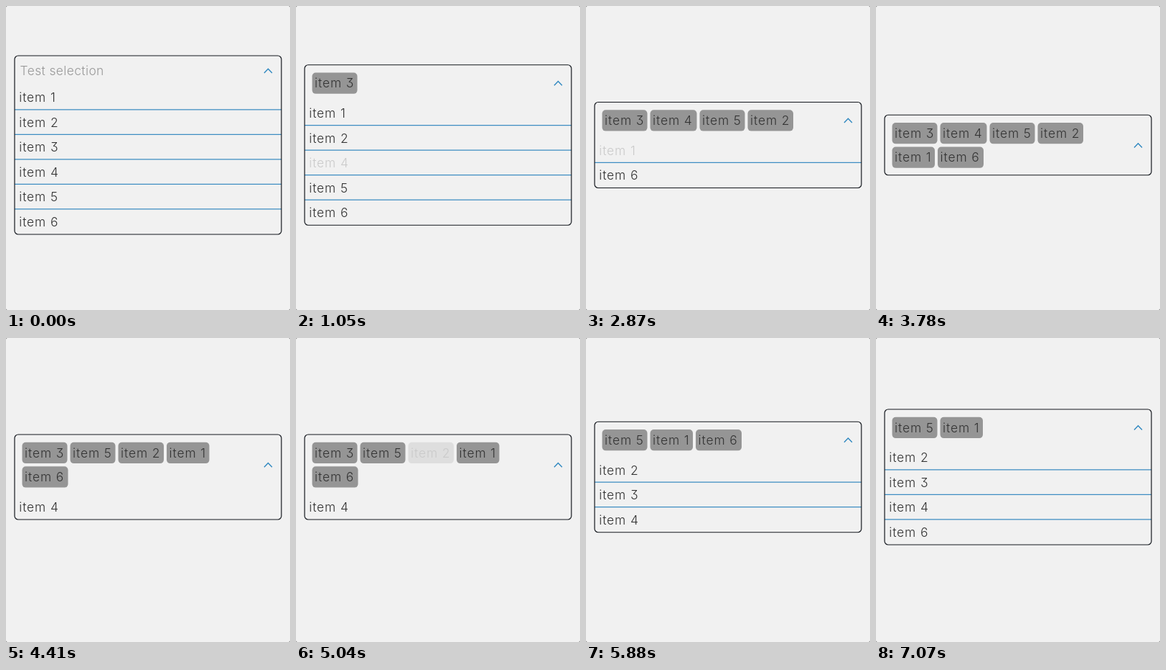
Recreate the animation shown at these times as an HTML page. Size 396 by 422 pixels, loop 8000 ms.

```html
<!DOCTYPE html>
<html lang="en">
<head>
<meta charset="utf-8">
<title>Multi select</title>
<style>
html, body { margin: 0; width: 100%; height: 100%; overflow: hidden; background: #f1f1f1; }
svg { display: block; width: 396px; height: 422px; background: #666; }
text { font: 350 17.4px Inter, "Open Sans", sans-serif; font-feature-settings: "cv09"; fill: #333; }
.item { letter-spacing: .9px; }
.hint { letter-spacing: .4px; fill: #999; }
.frame { fill: none; stroke: #14181e; stroke-width: 1.2; }
.line { stroke: #3d8dc2; stroke-width: 1.1; }
.chip { fill: #959595; }
.arrow { fill: none; stroke: #2f88c0; stroke-width: 1.4; }
.pressed { opacity: .2; }
</style>
</head>
<body>
<svg id="stage" viewBox="0 0 396 422"></svg>
<script>
const LOOP = 8000, MIDDLE = 193, LEFT = 12, RIGHT = 384;
const ROW = 34.5, CHIP_ROW = 33.5, CHIP_H = 29.4, GAP = 4, WRAP = 340;
const ITEMS = [...'123456'];
const CHIP_W = { 1: 59.5, 2: 63.5, 3: 63, 4: 65, 5: 63, 6: 64 };

// [start in ms, selected items in order, item being pressed]
const STATES = [
  [0, '', ''], [560, '', '3'],
  [700, '3', ''], [1050, '3', '4'],
  [1260, '34', ''], [1680, '34', '5'],
  [1820, '345', ''], [2310, '345', '2'],
  [2380, '3452', ''], [2870, '3452', '1'],
  [2940, '34521', ''], [3640, '34521', '6'],
  [3780, '345216', ''], [4340, '345216', '4'],
  [4410, '35216', ''], [5040, '35216', '2'],
  [5110, '3516', ''], [5740, '3516', '3'],
  [5880, '516', ''], [7000, '516', '6'],
  [7070, '51', '']
];

const stage = document.getElementById('stage');

function label(n, x, y) {
  return `<text class="item" x="${x}" y="${y}">item ${n}</text>`;
}

function group(isPressed, content) {
  return `<g class="${isPressed ? 'pressed' : ''}">${content}</g>`;
}

function placeChips(selected) {
  let x = 22.5, row = 0;
  return [...selected].map(n => {
    if (x + CHIP_W[n] > WRAP) { x = 22.5; row++; }
    const chip = { n, x, row };
    x += CHIP_W[n] + GAP;
    return chip;
  });
}

function render([, selected, pressed]) {
  const chips = placeChips(selected);
  const rest = ITEMS.filter(n => !selected.includes(n));
  const header = chips.length ? 50 + chips.at(-1).row * CHIP_ROW : 41;
  const height = header + rest.length * ROW;
  const top = MIDDLE - height / 2;
  const mid = top + header / 2;

  let out = '<rect width="396" height="422" rx="2" fill="#f1f1f1"/>';
  if (!chips.length) out += `<text class="hint" x="19.6" y="${top + 27}">Test selection</text>`;

  for (const { n, x, row } of chips) {
    const y = top + 10.7 + row * CHIP_ROW;
    out += group(n === pressed,
      `<rect class="chip" x="${x}" y="${y}" width="${CHIP_W[n]}" height="${CHIP_H}" rx="5"/>` +
      label(n, x + 3.6, y + 20.9));
  }

  rest.forEach((n, i) => {
    const bottom = top + header + (i + 1) * ROW - 0.6;
    out += group(n === pressed, label(n, 18.2, bottom - 10.6));
    if (i < rest.length - 1) {
      out += `<path class="line" d="M${LEFT} ${bottom}H${RIGHT}"/>`;
    }
  });

  out += `<path class="arrow" d="M360 ${mid + 3.5}l5.5 -5.7l5.5 5.7"/>`;
  out += `<rect class="frame" x="${LEFT}" y="${top}" width="${RIGHT - LEFT}" height="${height}" rx="5"/>`;
  stage.innerHTML = out;
}

let shown;
function tick() {
  const t = performance.now() % LOOP;
  const state = STATES.findLast(s => s[0] <= t);
  if (state !== shown) render(shown = state);
  requestAnimationFrame(tick);
}
tick();
</script>
</body>
</html>
```
